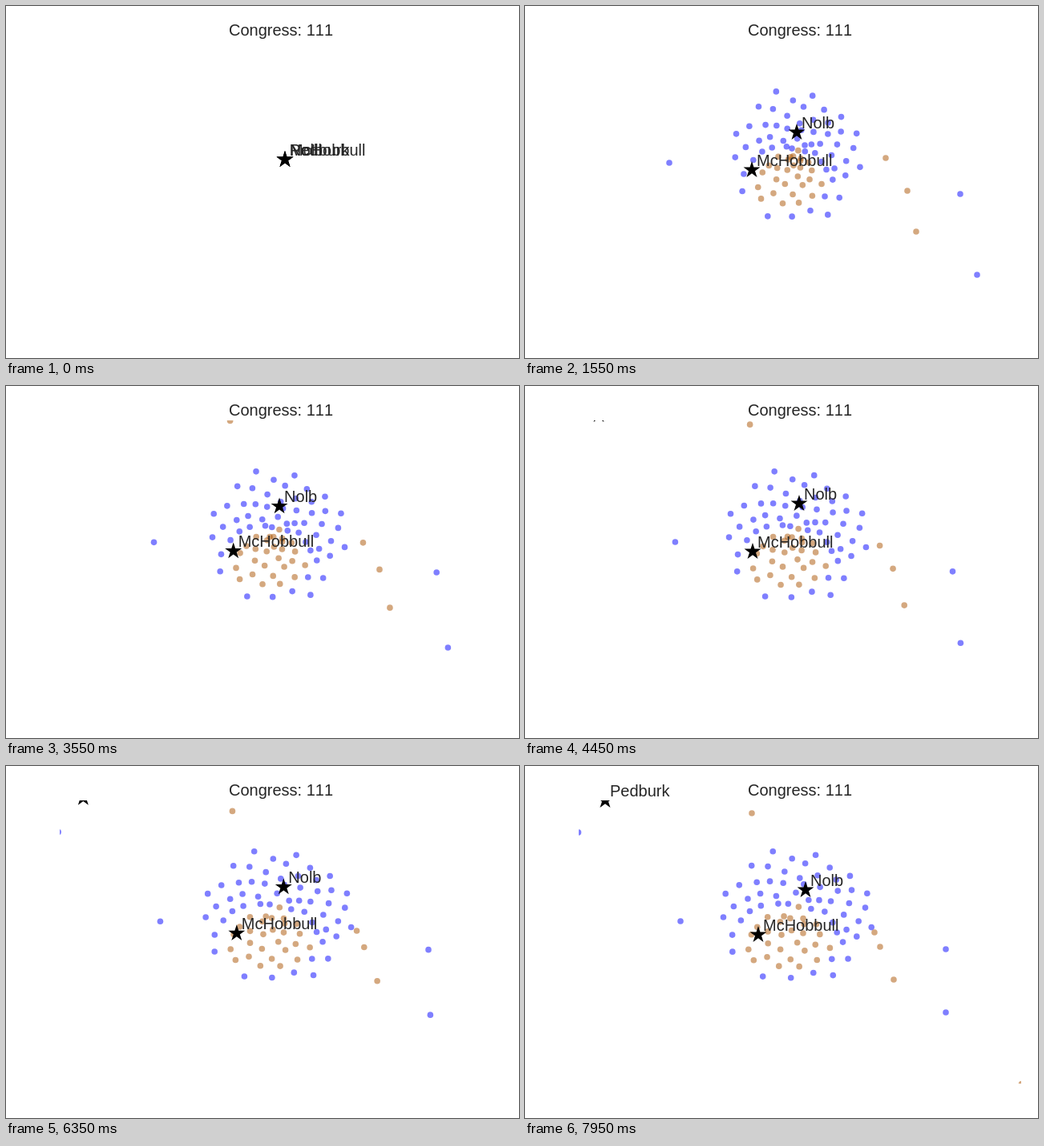
Animation, 640 px wide and 440 px high, one loop 8 s. Source, as an HTML page with a canvas:

```html
<!DOCTYPE html>
<html lang="en">
<head>
<meta charset="utf-8">
<title>Congress: 111</title>
<style>
  html, body { margin: 0; width: 100%; height: 100%; overflow: hidden; background: #fff; }
  canvas { display: block; }
</style>
</head>
<body>
<canvas id="stage" width="640" height="440"></canvas>
<script>
const ctx = document.getElementById('stage').getContext('2d');
const LOOP = 8000, STEP = 50;
const PLOT = { left: 67, top: 43, right: 619, bottom: 397 };
const ORIGIN = [348, 192], HUB = [340, 188];
const BLUE = 'rgba(0,0,255,0.5)', ORANGE = 'rgba(170,82,0,0.5)';
const GROWN = 900, BURST = 1550, MIDWAY = 4450, END = 7950;
const CLOUD_SIZE = 84, GOLDEN_ANGLE = Math.PI * (3 - Math.sqrt(5));

// Far points: where the burst throws them and where they drift back to.
const strays = [
  { color: BLUE, burst: [543, 235], rest: [525, 229] },
  { color: BLUE, burst: [564, 336], rest: [525, 308] },
  { color: BLUE, burst: [180, 196], rest: [194, 194] },
  { color: BLUE, burst: [55, 78], rest: [66.5, 83] },
  { color: ORANGE, burst: [450, 190], rest: [436, 208] },
  { color: ORANGE, burst: [477, 231], rest: [443, 226] },
  { color: ORANGE, burst: [488, 282], rest: [460, 267] },
  { color: ORANGE, burst: [278, 36], rest: [283, 59] },
  { color: ORANGE, burst: [650, 425], rest: [619.5, 397.5] }
];

// Stops at GROWN, BURST, MIDWAY and END.
const leaders = [
  { name: 'Nolb', path: [[339, 160], [339, 158], [342, 147], [350, 155]] },
  { name: 'Pedburk', path: [[346, 178], [84, 27], [92, 36], [100, 43.1]] },
  { name: 'McHobbull', path: [[277, 203], [283, 205], [284, 207], [291, 211]] }
];

const clamp = v => Math.max(0, Math.min(1, v));
const progress = (t, from, to) => clamp((t - from) / (to - from));
const mix = (a, b, k) => a + (b - a) * k;
const mixPoint = (a, b, k) => [mix(a[0], b[0], k), mix(a[1], b[1], k)];

function noise(seed) {
  const v = Math.sin(seed * 12.9898) * 43758.5453;
  return (v - Math.floor(v)) * 2 - 1;
}

// Sunflower cloud: dense in the middle at first, evening out as spread goes to 1.
function cloudPoint(i, spread) {
  const angle = i * GOLDEN_ANGLE;
  const r = Math.pow((i + 0.5) / CLOUD_SIZE, 0.85 - 0.25 * spread);
  return [
    HUB[0] + r * (78 + 20 * spread) * Math.cos(angle) + 3 * noise(i + 1),
    HUB[1] + r * 82 * Math.sin(angle) + 3 * noise(i + 101)
  ];
}

// The orange party fills an ellipse in the lower left of the cloud.
const cloudColors = Array.from({ length: CLOUD_SIZE }, (_, i) => {
  const [x, y] = cloudPoint(i, 1);
  return Math.hypot((x - 325) / 62, (y - 214) / 40) < 1 ? ORANGE : BLUE;
});

function strayPoint({ burst, rest }, flight, settle) {
  const start = mixPoint(HUB, burst, 0.5);
  return mixPoint(mixPoint(start, burst, flight), rest, settle);
}

function leaderPoint({ path }, t) {
  const thrown = mixPoint(path[0], path[1], progress(t, GROWN, BURST));
  const halfway = mixPoint(thrown, path[2], progress(t, BURST, MIDWAY));
  return mixPoint(halfway, path[3], progress(t, MIDWAY, END));
}

function dot([x, y], color) {
  ctx.fillStyle = color;
  ctx.beginPath();
  ctx.arc(x, y, 3.8, 0, Math.PI * 2);
  ctx.fill();
}

function star([x, y]) {
  ctx.beginPath();
  for (let i = 0; i < 10; i++) {
    const r = i % 2 ? 4.2 : 11, a = i * Math.PI / 5;
    ctx.lineTo(x + r * Math.sin(a), y - r * Math.cos(a));
  }
  ctx.fill();
}

function draw(t) {
  const u = progress(t, 50, GROWN), growth = u * (2 - u);
  const flight = progress(t, GROWN, BURST);
  const settle = Math.sin(progress(t, BURST, END) * Math.PI / 2) ** 1.5;
  const spread = 0.3 * flight + 0.7 * settle;
  const grow = point => mixPoint(ORIGIN, point, growth);
  const heads = leaders.map(leader => grow(leaderPoint(leader, t)));

  ctx.fillStyle = '#fff';
  ctx.fillRect(0, 0, 640, 440);
  ctx.save();
  ctx.beginPath();
  ctx.rect(PLOT.left, PLOT.top, PLOT.right - PLOT.left, PLOT.bottom - PLOT.top);
  ctx.clip();
  if (growth > 0) {
    cloudColors.forEach((color, i) => dot(grow(cloudPoint(i, spread)), color));
    strays.forEach(stray => dot(grow(strayPoint(stray, flight, settle)), stray.color));
  }
  ctx.fillStyle = '#000';
  heads.forEach(star);
  ctx.restore();

  ctx.fillStyle = '#262626';
  ctx.font = '20px "Liberation Sans", Arial, sans-serif';
  ctx.fontKerning = 'none';
  ctx.fillText('Congress: 111', 278, 37);
  heads.forEach(([x, y], i) => {
    if (x >= PLOT.left && y >= PLOT.top) ctx.fillText(leaders[i].name, x + 6, y - 5.5);
  });
}

function frame() {
  const t = performance.now() % LOOP;
  draw(Math.floor(t / STEP) * STEP);
  requestAnimationFrame(frame);
}
frame();
</script>
</body>
</html>
```
